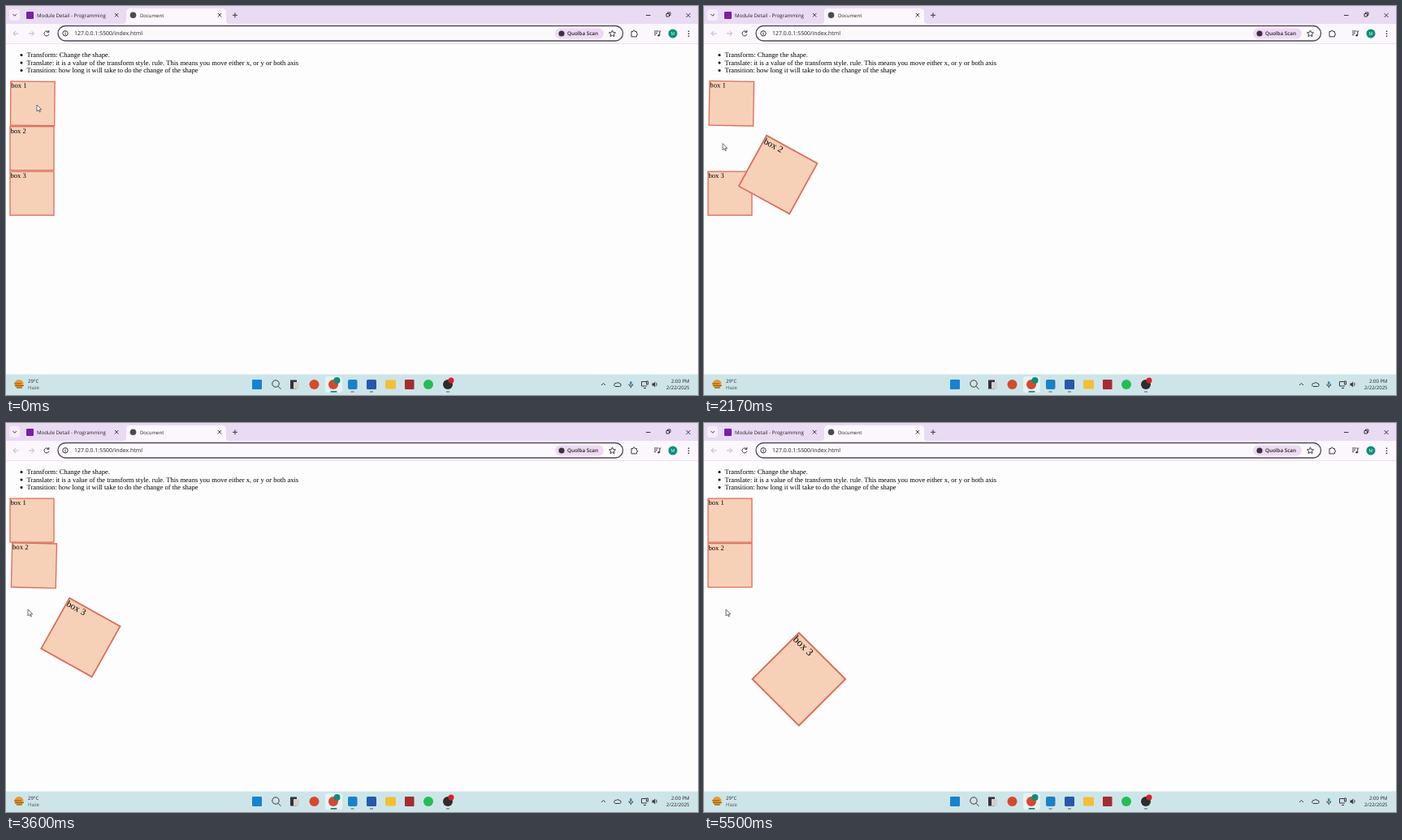
An HTML page for the animation above (5530 ms loop, 852 px wide and 480 px high).

```html
<!DOCTYPE html>
<html lang="en">
<head>
<meta charset="utf-8">
<title>Document</title>
<style>
  html, body { margin: 0; width: 100%; height: 100%; overflow: hidden; background: #fefdfe; }
  svg { display: block; }
  text { font-family: "Open Sans", "Noto Sans", sans-serif; font-size: 6px; fill: #222; text-rendering: geometricPrecision; }
  .page text { font-family: "Liberation Serif", serif; font-size: 8.52px; fill: #000; }
  .line { fill: none; stroke: #3a3640; stroke-width: 1; }
  .pale { stroke: #bbb4c0; }
</style>
</head>
<body>
<svg width="852" height="480" viewBox="0 0 852 480">
  <!-- tab strip -->
  <rect width="852" height="22" fill="#e9dbf3"/>
  <rect x="4" y="4" width="13" height="14" rx="4" fill="#f6edfa"/>
  <path class="line" d="M8.5 10l2.2 2.2 2.2-2.2"/>
  <rect x="25" y="7" width="9" height="9" rx="1" fill="#7a1fa8"/>
  <text x="38" y="13.7" style="font-size:6.2px">Module Detail - Programming</text>
  <path class="line" d="M134 9l4.4 4.4m0-4.4l-4.4 4.4"/>
  <path d="M144 22q4 0 4-4V8q0-5 5-5h113q5 0 5 5v10q0 4 4 4z" fill="#fbf7fd"/>
  <circle cx="156.5" cy="11.3" r="3.8" fill="#4c4a50"/>
  <text x="165" y="13.7">Document</text>
  <path class="line" d="M260.8 9l4.4 4.4m0-4.4l-4.4 4.4M279 11.3h6m-3-3v6"/>
  <path class="line" d="M788 11.5h5.5M837.500 9l5 5m0-5l-5 5"/>
  <path class="line" d="M813 9.5h3.500V13H813zM814.500 9.300V8H818v3.500h-1.300"/>

  <!-- toolbar -->
  <rect y="22" width="852" height="24" fill="#fbf7fd"/>
  <path d="M0 46.500h852" stroke="#eae2ee"/>
  <path class="line pale" d="M15.500 34H9m3-3l-3 3 3 3M28 34h6.500m-3-3l3 3-3 3"/>
  <path class="line" d="M52.300 32a3 3 0 1 0 .6 2.700M52.800 30v2.400h-2.400"/>
  <rect x="64" y="24.500" width="695.500" height="18.500" rx="9.250" fill="#fcf9fd" stroke="#54485c" stroke-width="1.300"/>
  <circle class="line" cx="73" cy="33.800" r="3.200"/>
  <path class="line" d="M73 33.200v2.500m0-4v.8"/>
  <text x="84" y="36.300" style="font-size:6.950px">127.0.0.1:5500/index.html</text>
  <rect x="676" y="27.500" width="60" height="13" rx="6.500" fill="#eed8f3"/>
  <circle cx="684" cy="34" r="3.600" fill="#3b3340"/>
  <text x="691" y="36.400" font-weight="600" style="font-size:6.300px">Quolba Scan</text>
  <path class="line" d="M746.500 30l1.200 2.600 2.800.3-2.100 1.900.6 2.800-2.500-1.400-2.500 1.400.6-2.800-2.100-1.900 2.800-.3z"/>
  <path class="line" d="M770 31.500h2q0-1.500 1.200-1.500t1.200 1.500h2v2.200q1.300 0 1.300 1.100t-1.300 1.100v2h-6.400z"/>
  <path class="line" d="M798 31h5.500m-5.500 2.300h4m-4 2.300h2.500M804.800 36v-5h1.500"/>
  <circle cx="803.700" cy="36.200" r="1.300" fill="#3a3640"/>
  <circle cx="821" cy="34" r="5.500" fill="#0b8f7a"/>
  <text x="821" y="36" text-anchor="middle" style="font-size:5.500px;fill:#eaffff">M</text>
  <path d="M840.500 30.500v7.500" stroke="#3a3640" stroke-width="1.500" stroke-dasharray="1.500 1.500"/>

  <!-- page -->
  <g class="page">
    <g><circle cx="19" cy="60.500" r="1.500"/><circle cx="19" cy="70" r="1.500"/><circle cx="19" cy="79.500" r="1.500"/></g>
    <text x="25.500" y="63">Transform: Change the shape.</text>
    <text x="25.500" y="72.500">Translate: it is a value of the transform style. rule. This means you move either x, or y or both axis</text>
    <text x="25.500" y="82">Transition: how long it will take to do the change of the shape</text>
    <g id="boxes"></g>
  </g>

  <!-- taskbar -->
  <rect y="454.500" width="852" height="25.500" fill="#cde5e9"/>
  <circle cx="16" cy="466.500" r="5.500" fill="#e89a2c"/>
  <path d="M10 466h9m-8 2.500h11m-9 2.500h7" stroke="#8a5a20" stroke-width="1.200"/>
  <text x="27" y="464.800">29°C</text>
  <text x="27" y="473" fill-opacity=".75">Haze</text>
  <rect x="303" y="461" width="12" height="12" rx="1" fill="#1683cf"/>
  <circle class="line" cx="332" cy="466" r="4.200"/>
  <path class="line" d="M335 469.300l3.500 3.500"/>
  <rect x="350" y="461.500" width="8" height="11" fill="#333238"/>
  <rect x="354" y="464" width="7" height="8.500" fill="#d4d0cc"/>
  <circle cx="379.500" cy="467" r="6" fill="#d5492f"/>
  <rect x="393" y="457" width="21" height="20" rx="3" fill="#e6f2f5"/>
  <circle cx="403" cy="467" r="6" fill="#d5492f"/>
  <circle cx="407.500" cy="462" r="4" fill="#0b8f7a"/>
  <rect x="399.500" y="475" width="8" height="1.800" rx=".9" fill="#24836c"/>
  <rect x="421" y="461" width="11.500" height="12" rx="2" fill="#1a82c4"/>
  <rect x="444" y="461" width="12" height="12" rx="1.500" fill="#2559ad"/>
  <rect x="467" y="461.500" width="13" height="11" rx="1.500" fill="#f3bf35"/>
  <rect x="491" y="461" width="11.500" height="12" rx="1" fill="#a52c32"/>
  <circle cx="520" cy="467" r="6" fill="#23bd55"/>
  <circle cx="544" cy="467" r="6" fill="#302b2c"/>
  <circle cx="548" cy="462" r="3.500" fill="#dc2022"/>
  <path d="M424.500 476h4m19.500 0h4m90 0h4" stroke="#7d8b90" stroke-width="1.300"/>
  <path class="line" d="M733 468l2.500-2.500 2.500 2.500"/>
  <path class="line" d="M750 469.500q-2-1-1-3 .8-1.500 2.500-1 1.500-2 3.500 0 3 .5 2 3-.3 1-1.500 1z"/>
  <rect x="768" y="463" width="2.600" height="4.800" rx="1.300" fill="#4b8bab"/>
  <path class="line" d="M766.800 466.500q0 2.700 2.500 2.700t2.500-2.700m-2.500 2.700v2"/>
  <path class="line" d="M788 463.500h-5.500v5.500h6.500M785 471.500h3M788.500 463h2v4h-2z"/>
  <path d="M795.500 465.500h1.700l2-2v7l-2-2h-1.700z" fill="#3a3640"/>
  <path class="line" d="M800.500 464.800q1.500 2 0 4"/>
  <text x="841.500" y="464.800" text-anchor="end">2:00 PM</text>
  <text x="841.500" y="473" text-anchor="end">2/22/2025</text>

  <path id="cursor" d="M0 0V8L2 6.300 3.300 9 4.400 8.500 3.200 5.800H5.800Z" fill="#fff" stroke="#4c4850" stroke-width=".8"/>
</svg>
<script>
const LOOP = 5530, HOVER = 3000;
const boxes = [
  { y: 120.2, enter: -58, leave: 915 },
  { y: 175.7, enter: 1058, leave: 2185 },
  { y: 231.2, enter: 2471, leave: Infinity }
];
// Pointer stops: time, x, y
const stops = [
  [0, 38, 122], [250, 38, 122], [600, 38, 113], [850, 38, 113],
  [1058, 28, 149], [1300, 23, 167], [2120, 23, 168.5], [2185, 23, 170],
  [2471, 26, 206], [2700, 27, 230], [LOOP, 27, 230]
];
const clamp = v => Math.max(0, Math.min(1, v));
const bezier = (s, a, b) => 3 * s * (1 - s) ** 2 * a + 3 * s * s * (1 - s) * b + s ** 3;

// CSS "ease" timing
function ease(x) {
  x = clamp(x);
  let lo = 0, hi = 1;
  for (let i = 0; i < 24; i++) {
    const mid = (lo + hi) / 2;
    if (bezier(mid, .25, .25) < x) lo = mid; else hi = mid;
  }
  return bezier(lo, .1, 1);
}

// An interrupted transition returns in proportionally less time
function progress({ enter, leave }, t) {
  const p = ease((Math.min(t, leave) - enter) / HOVER);
  return t < leave ? p : p * (1 - ease((t - leave) / (HOVER * p)));
}

function pointer(t) {
  const i = Math.max(1, stops.findIndex(s => s[0] >= t));
  const [t0, x0, y0] = stops[i - 1], [t1, x1, y1] = stops[i];
  const k = (t - t0) / (t1 - t0);
  return [x0 + (x1 - x0) * k, y0 + (y1 - y0) * k];
}

const layer = document.getElementById("boxes");
const cursor = document.getElementById("cursor");
layer.innerHTML = boxes.map((b, i) =>
  `<g><rect x="-27" y="-27" width="54" height="54" fill="#f6d1b8" stroke="#dc6c58" stroke-width="1.3"/>
   <text x="-26.5" y="-19.2">box ${i + 1}</text></g>`).join("");
boxes.forEach((b, i) => b.node = layer.children[i]);

function draw(now) {
  const t = now % LOOP;
  for (const b of boxes) {
    const p = b.p = progress(b, t);
    b.node.setAttribute("transform",
      `translate(32 ${b.y}) rotate(${45 * p}) scale(${1 + p / 2}) translate(${80 * p})`);
  }
  // Transformed boxes stack above those at rest
  const order = [...boxes.filter(b => b.p < 1e-4), ...boxes.filter(b => b.p >= 1e-4)];
  order.forEach((b, i) => {
    if (layer.children[i] !== b.node) layer.insertBefore(b.node, layer.children[i]);
  });
  cursor.setAttribute("transform", `translate(${pointer(t)})`);
  requestAnimationFrame(draw);
}
draw(0);
</script>
</body>
</html>
```
